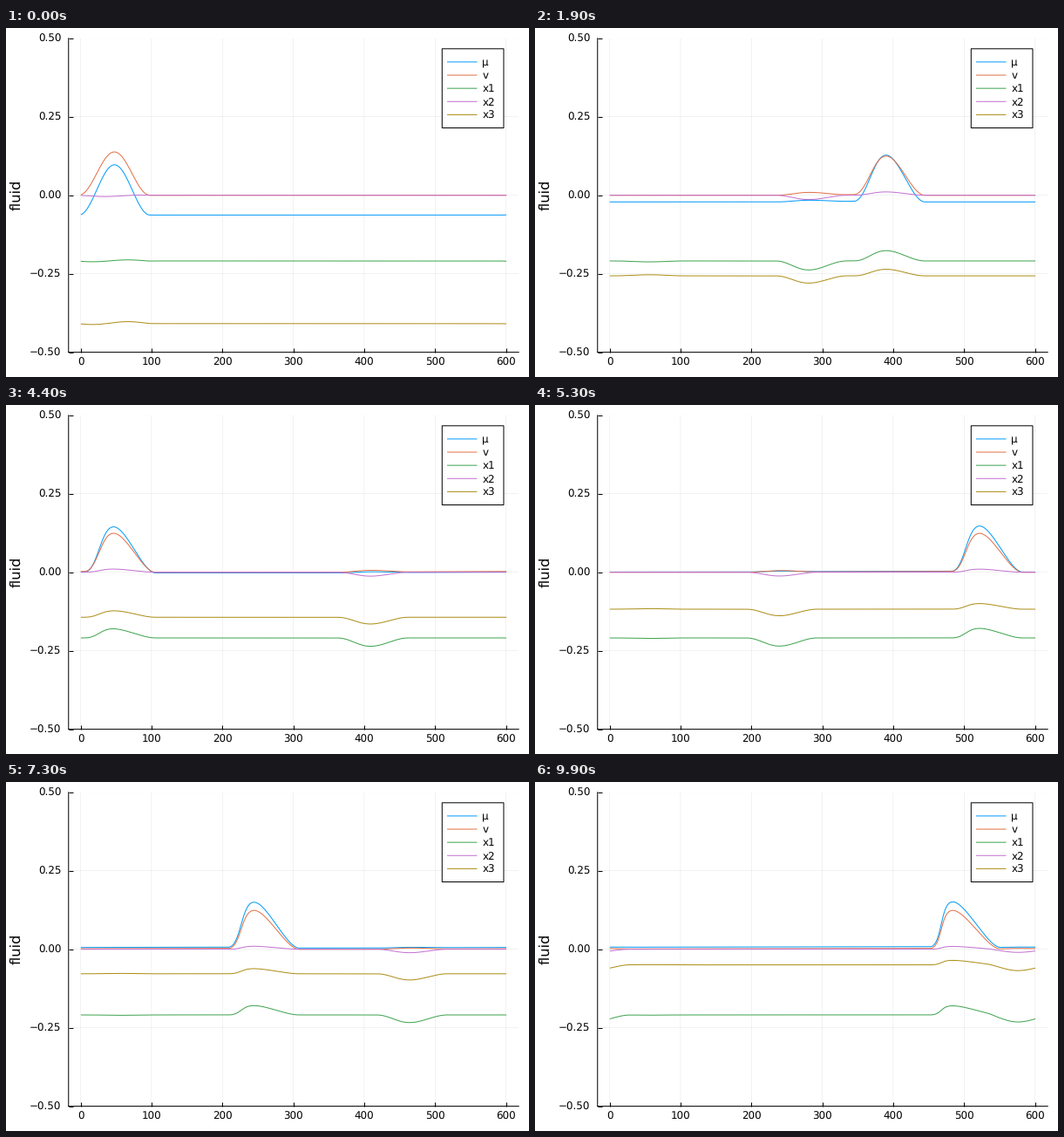
These frames come from a looping animation (600 by 400 pixels, 10000 ms). A matplotlib script:

```python
import numpy as np
import matplotlib.pyplot as plt
from matplotlib.animation import FuncAnimation

W, H, DPI = 600, 400, 100
FRAMES, STEP = 100, 100
N, HALF = 600, 50          # periodic domain and half width of a pulse
PX = 72 / DPI              # one pixel in points
NAMES = ["μ", "v", "x1", "x2", "x3"]
COLORS = ["#009AFA", "#E36F47", "#3EA44E", "#C371D2", "#AC8E18"]

plt.rcParams.update({
    "font.family": "DejaVu Sans",
    "font.size": 8.53,
    "text.hinting": "none",
    "path.snap": False,
    "lines.linewidth": PX,
})

# Unwrapped crest positions of the two left-going waves
TIMES = [0, 19, 33, 44, 61, 84, 99]
SLOW = [48, -210, -402, -553.5, -789, -1108, -1316]
FAST = [44, -319, -585, -791, -1111, -1542, -1824]

x = np.arange(1, N + 1)


def wrap(u, low=-N / 2):
    return (u - low) % N + low


def smooth(u):
    u = np.clip(u, 0, 1)
    return u * u * (3 - 2 * u)


def pulse(crest, skew=0.0):
    """Squared-sine hump whose top leans left by skew."""
    th = np.linspace(0, np.pi, 200)
    h = np.sin(th) ** 2
    xs = -HALF + 2 * HALF * th / np.pi - skew * h
    return np.interp(wrap(x - crest - skew), xs, h)


def wake(t, slow, fast):
    """Slight rise between the fast wave and the slow front."""
    gap = slow - fast
    u = wrap(x - fast, -HALF)
    level = 0.001 + 0.002 * np.clip(u / max(gap, 1), 0, 1)
    return level * smooth((u + 45) / 90) * smooth((gap - u) / 40) * min(1, t / 10)


def state(t):
    slow = np.interp(t, TIMES, SLOW)
    fast = np.interp(t, TIMES, FAST)
    a = pulse(slow, 17.5 * (t / 99) ** 0.8)
    b = pulse(fast, 3 * min(1, t / 20))
    c = pulse(56)
    w = wake(t, slow, fast)

    def decay(k):
        return np.exp(-k * t)

    mu = (0.006 - 0.069 * decay(0.049) + (0.1455 + 0.0075 * decay(0.04)) * a
          + 0.0072 * decay(0.02) * b + w)
    v = (0.1238 + 0.0025 * decay(0.04)) * a + 0.012 * decay(0.017) * b + w
    x1 = (-0.2092 + (0.0285 + 0.007 * decay(0.025)) * a
          - 0.0305 * decay(0.0031) * b - 0.0042 * decay(0.018) * c)
    x2 = 0.0112 * decay(0.0022) * a - 0.0147 * decay(0.004) * b
    x3 = (-0.0208 - 0.388 * decay(0.0262) + 0.0228 * decay(0.0046) * a
          - 0.0245 * decay(0.003) * b + 0.005 * decay(0.02) * c)
    return mu, v, x1, x2, x3


fig = plt.figure(figsize=(W / DPI, H / DPI), dpi=DPI, facecolor="white")

LEFT, RIGHT, TOP, BOTTOM = 71.75, 588.19, 11.81, 371.61
SPAN = RIGHT - LEFT
ax = fig.add_axes([LEFT / W, 1 - BOTTOM / H, SPAN / W, (BOTTOM - TOP) / H])
margin = 0.03 * (N - 1)
ax.set_xlim(1 - margin, N + margin)
ax.set_ylim(-0.5, 0.5)
x_ticks = range(0, 601, 100)
y_ticks = [-0.5, -0.25, 0, 0.25, 0.5]
ax.set_xticks(x_ticks)
ax.set_yticks(y_ticks)
ax.tick_params(direction="in", length=4.72 * PX, width=PX,
               labelbottom=False, labelleft=False)
ax.spines[["top", "right"]].set_visible(False)
ax.spines[["left", "bottom"]].set_linewidth(PX)
ax.grid(color="black", alpha=0.1, linewidth=0.5 * PX)
ax.set_axisbelow(True)

lines = [ax.plot([], [], color=c, clip_on=False)[0] for c in COLORS]

# Pixel-space layer for all text and the legend
ov = fig.add_axes([0, 0, 1, 1])
ov.set_xlim(0, W)
ov.set_ylim(H, 0)
ov.axis("off")


def label(px, py, s, ha="left", **kw):
    ov.text(px, py, s, ha=ha, va="baseline", **kw)


for tick in x_ticks:
    px = LEFT + SPAN * (tick - 1 + margin) / (N - 1 + 2 * margin)
    label(px, 386.5, str(tick), "center")
for tick in y_ticks:
    py = BOTTOM - (BOTTOM - TOP) * (tick + 0.5)
    label(63.6, py + 4.32, f"{tick:.2f}".replace("-", "−"), "right")
label(16, 191.7, "fluid", "center", fontsize=11.73, rotation=90,
      rotation_mode="anchor")

box_left, box_right = 500.3, RIGHT - SPAN / 30
box_top, row = TOP + (BOTTOM - TOP) / 30, 15.12
ov.add_patch(plt.Rectangle((box_left, box_top), box_right - box_left, 6 * row,
                           fc="white", ec="black", lw=PX))
inset = SPAN / 90
start = box_left + inset
end = start + SPAN / 15
for i, (name, color) in enumerate(zip(NAMES, COLORS), 1):
    y = box_top + i * row
    ov.plot([start, end], [y, y], color=color, solid_capstyle="butt")
    label(end + inset, y + 4.32, name)


def update(t):
    for line, y in zip(lines, state(t)):
        line.set_data(x, y)
    return lines


anim = FuncAnimation(fig, update, frames=FRAMES, interval=STEP, repeat=True,
                     repeat_delay=0, blit=False)
plt.show()
```
